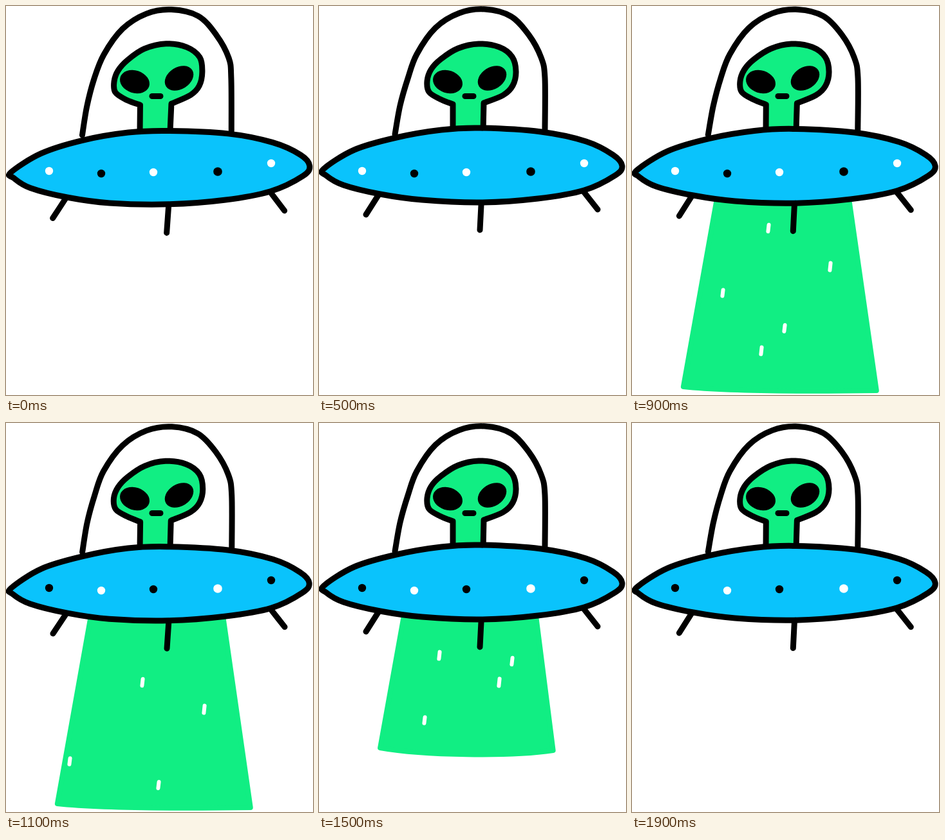
Animation of 477 by 606 pixels, one loop 2000 ms. Source, as an HTML page:

```html
<!DOCTYPE html>
<html lang="en">
<head>
<meta charset="utf-8">
<title>Flying saucer</title>
<style>
html, body { margin: 0; width: 100%; height: 100%; overflow: hidden; background: #fff; }
svg { display: block; width: 100vw; height: 100vh; }
.line { fill: none; stroke: #000; stroke-width: 9; stroke-linecap: round; stroke-linejoin: round; }
.green { fill: #11ee83; }
.blue { fill: #0ac3fc; }
#beam { stroke: #11ee83; stroke-width: 8; stroke-linejoin: round; }
#sparks { fill: none; stroke: #fff; stroke-width: 6; stroke-linecap: round; }
</style>
</head>
<body>
<svg viewBox="0 0 477 606">
  <path id="beam" class="green"/>
  <path id="sparks"/>
  <path id="legs" class="line"/>
  <path id="dome" class="line"/>
  <path id="head" class="line green"/>
  <ellipse rx="23.500" ry="17.500" transform="translate(200 118) rotate(18)"/>
  <ellipse rx="24" ry="17" transform="translate(269 112.500) rotate(-32)"/>
  <path class="line" d="M227 140.500H240"/>
  <path id="ship" class="line blue"/>
  <g id="lamps"></g>
</svg>
<script>
const STEP = 100, COUNT = 20, FULL = 604;
const $ = id => document.getElementById(id);
const parse = s => s.split(' ').map(p => p.split(',').map(Number));

const ship = parse('7,254 55,224 120,205 190,193 250,190 345,196 415,211 457,232 471,249 460,264 412,287 340,300 252,306 160,302 95,293 38,279 11,264');
const dome = parse('118,200 126,155 138,113 152,75 181,34 218,11 258,5 298,16 326,45 345,80 351,112 351,194');
const head = parse('208,153 188,145 171,134 168,117 174,99 189,83 216,66 248,59 280,64 300,79 306,102 301,124 286,139 256,151');
const legs = ['92,295 73,325', '252,310 250,349', '411,289 433,317'].map(parse);

// How far the saucer sags to the left in each redrawing; also the strength of the hand wobble.
const sags = [5, 3, 2, 0, 5, 0, 2, 3, 5, 2];

// Sparks: x, y at a key step, then the drift per step.
const falling = { key: 9, sparks: [
  [212, 346, 0, 29], [308, 406, 0, 20], [141, 447, -21, 40], [237, 502, 0, 31], [201, 537, -1, 65]
] };
const rising = { key: 15, sparks: [
  [300, 371, 2, -14], [280, 404, 6, -13], [164, 463, 4, -10], [290, 510, -1, -13], [187, 362, 0, 32]
] };

const noise = n => (Math.sin(n * 127.1) * 43758.5 % 1);

function sketch(points, sag, weight) {
  return points.map(([x, y], n) => [
    x + noise(n + sag * 31) * sag * 0.25,
    y + weight * sag * (1 - (x / 500) ** 2) + noise(n + sag * 57) * sag * 0.2
  ]);
}

// Smooth curve through points.
function spline(points, closed) {
  const n = points.length;
  const at = i => points[closed ? (i + n) % n : Math.max(0, Math.min(n - 1, i))];
  let d = 'M' + points[0];
  for (let i = 0; i < n - (closed ? 0 : 1); i++) {
    const [a, b, c, e] = [at(i - 1), at(i), at(i + 1), at(i + 2)];
    const c1 = b.map((v, k) => v + (c[k] - a[k]) / 6);
    const c2 = c.map((v, k) => v - (e[k] - b[k]) / 6);
    d += `C${c1} ${c2} ${c}`;
  }
  return d + (closed ? 'Z' : '');
}

// The beam shoots out with a slight acceleration, holds, then shrinks evenly.
function beamBottom(i) {
  if (i < 6 || i > 18) return 0;
  const k = i - 6;
  return Math.min(FULL, 391 + 56 * k + 5 * k * k, 362 + 53 * (18 - i));
}

function beamPath(b) {
  const full = b >= FULL;
  const low = b - 4;
  const left = low - (full ? 7 : 11), right = low - (full ? 1 : 7);
  const dy = right - 301;
  const xl = 131 - (left - 301) * 0.175;
  const xr = 337 + dy * 0.09 + dy * dy * 0.00018;
  const w = xr - xl;
  return `M132 300L${xl} ${left}C${xl + w * 0.25} ${low + 1} ${xl + w * 0.75} ${low + 3 * !full} ${xr} ${right}L337 300Z`;
}

function sparkPath(i, b) {
  const { key, sparks } = i < 12 ? falling : rising;
  return sparks.map(([x, y, dx, dy], n) => {
    const cx = x + dx * (i - key), cy = y + dy * (i - key);
    if (cy < 310 || cy > b - 15) return '';
    const half = 5 + noise(n + 1) * 0.8;
    return `M${cx + 0.6} ${cy - half}L${cx - 0.6} ${cy + half}`;
  }).join('');
}

const lamps = parse('67,257 148,261 229,259 329,258 412,245').map(([x, y], n) => {
  const c = document.createElementNS('http://www.w3.org/2000/svg', 'circle');
  c.setAttribute('cx', x);
  c.setAttribute('cy', y);
  c.setAttribute('r', n === 3 ? 6.8 : 6.2);
  return $('lamps').appendChild(c);
});

function draw(i) {
  const sag = sags[i % sags.length];
  const b = beamBottom(i);
  const set = (id, d) => $(id).setAttribute('d', d);
  set('beam', b ? beamPath(b) : '');
  set('sparks', b ? sparkPath(i, b) : '');
  set('legs', legs.map(leg => spline(sketch(leg, sag, 1))).join(''));
  set('dome', spline(sketch(dome, sag, 0.2)));
  set('head', spline(sketch(head, sag, 0.2)) + 'L255 196H208Z');
  set('ship', spline(sketch(ship, sag, 1), true));
  const phase = (i >> 1) % 2;
  lamps.forEach((c, n) => c.setAttribute('fill', (n + phase) % 2 ? '#000' : '#fff'));
}

function tick() {
  draw(Math.floor(performance.now() / STEP) % COUNT);
  requestAnimationFrame(tick);
}
tick();
</script>
</body>
</html>
```
